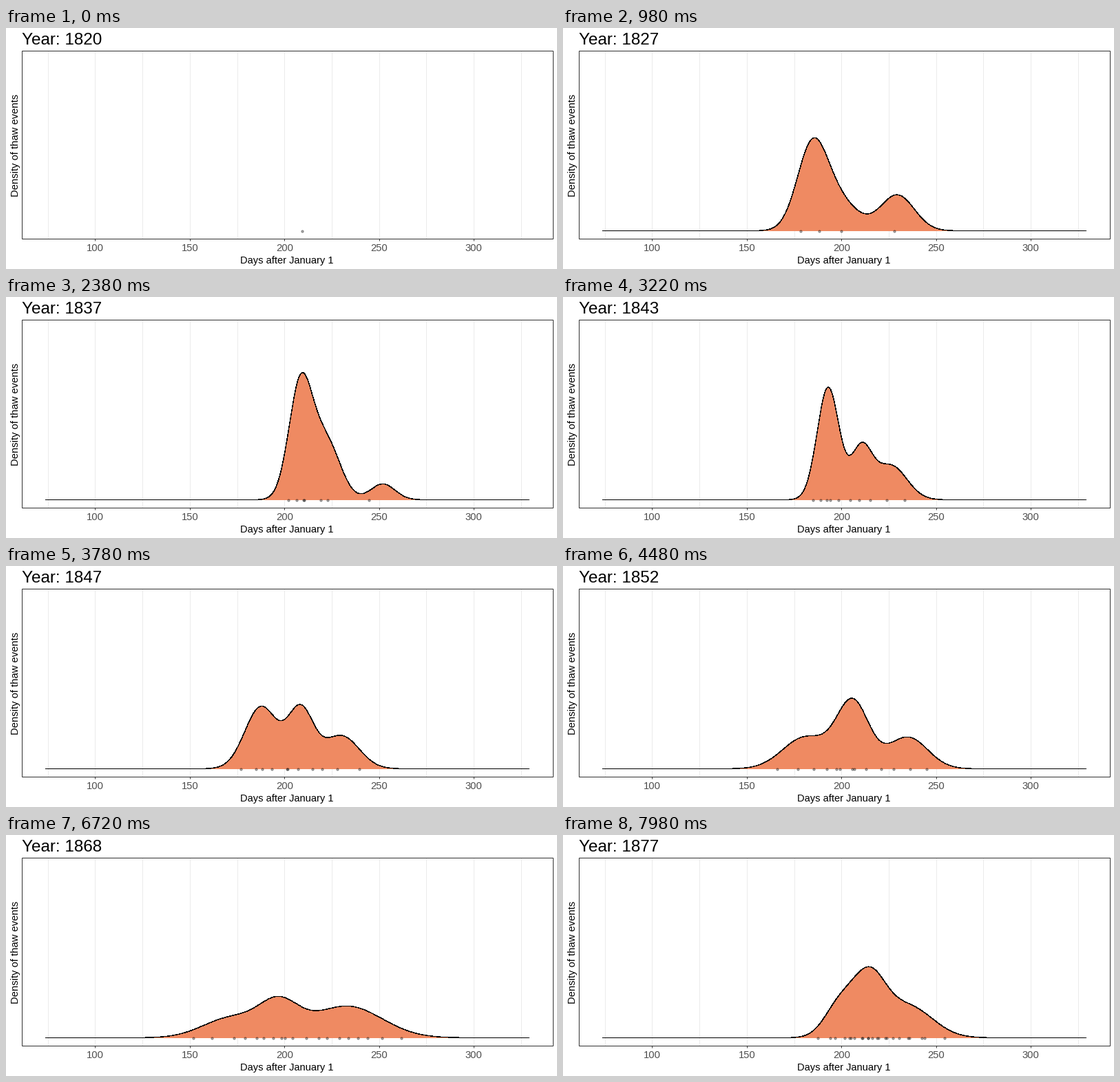
A matplotlib script that plays this animation: 800 px wide and 350 px high, repeating every 8000 ms.

```python
import numpy as np
import matplotlib.pyplot as plt
from matplotlib.animation import FuncAnimation
from matplotlib.patches import Polygon, Rectangle

W, H, DPI = 800, 350, 100
PX = 72 / DPI                 # one pixel in points
FIRST_YEAR = 1820
STEP, LOOP, TICK = 140, 8000, 20
BASE = 294.5                  # y of zero density

# Key shapes: three bumps per year as (centre day, spread, height in px)
KEYS = {
    1820: [(211, 9, 67)] * 3,
    1827: [(184.5, 8, 118), (198.5, 10, 42), (229.5, 9, 52)],
    1837: [(208.5, 6.2, 166), (222, 7.5, 84), (252, 6.5, 23)],
    1843: [(193, 5.8, 163), (210.5, 5.5, 72), (226, 8.5, 50)],
    1852: [(181, 12, 46), (206, 8.5, 96), (235, 10.5, 46)],
    1868: [(172, 15, 29), (197, 10.5, 46), (233, 18.5, 46)],
    1877: [(199, 8, 46), (214.5, 8.5, 83), (235, 13, 46)],
}
years = list(KEYS)
shapes = np.array(list(KEYS.values()), float)
shapes[..., 2] *= shapes[..., 1]      # tween areas, so the total stays even
tracks = shapes.reshape(len(years), -1).T

days = np.linspace(74, 329.3, 512)


def day_x(day):
    return 404.25 + (np.asarray(day) - 200) * 2.748


def density(year):
    pose = [np.interp(year, years, track) for track in tracks]
    centre, spread, area = np.reshape(pose, (3, 3)).T[:, :, None]
    return (area / spread * np.exp(-0.5 * ((days - centre) / spread) ** 2)).sum(0)


def events(curve, year):
    """Days spread evenly over the density, a little shaken, more each year."""
    n = round(1 + 0.38 * (year - FIRST_YEAR))
    total = np.cumsum(curve)
    even = np.interp((np.arange(n) + 0.5) / n, total / total[-1], days)
    return even + np.random.default_rng(year).normal(0, 1, n)


plt.rcParams["font.family"] = "Liberation Sans"
fig = plt.figure(figsize=(W / DPI, H / DPI), dpi=DPI, facecolor="white")
ax = fig.add_axes([0, 0, 1, 1])
ax.set(xlim=(0, W), ylim=(H, 0))
ax.axis("off")


def label(x, y, text, size, color="black", ha="center", rotation=0):
    return ax.text(x, y, text, fontsize=size * PX, color=color, ha=ha,
                   va="baseline", rotation=rotation, rotation_mode="anchor")


ax.vlines(day_x(np.arange(75, 326, 25)), 33, 306, color="#ebebeb",
          lw=PX, zorder=1)
ax.vlines(day_x(np.arange(100, 301, 50)), 306, 309, color="#333333",
          lw=PX, zorder=1)
ax.add_patch(Rectangle((23, 33), 771, 273, fill=False, ec="#333333",
                       lw=PX, zorder=5))
for d in range(100, 301, 50):
    label(day_x(d) + 0.2, 324, str(d), 14.7, "#4d4d4d")
label(408, 342, "Days after January 1", 14.6)
label(18, 170.5, "Density of thaw events", 14.7, rotation=90)
title = label(23, 24, "", 24.3, ha="left")

xs = day_x(days)
area_fill = Polygon([(0, 0)], closed=True, fc="#ef8a62", ec="none",
                    antialiased=False, zorder=2)
ax.add_patch(area_fill)
# Without antialiasing every touched pixel is inked: half a pixel draws one
outline, = ax.plot([], [], color="black", lw=0.4 * PX, antialiased=False,
                   zorder=3)
dots, = ax.plot([], [], "o", ms=3.2 * PX, mfc=(0, 0, 0, 0.28),
                mec=(0, 0, 0, 0.45), mew=0.9 * PX, ls="none", zorder=4)


def draw(i):
    year = FIRST_YEAR + i * TICK // STEP
    title.set_text(f"Year: {year}")
    curve = density(year)
    hits = events(curve, year)
    dots.set_data(day_x(hits), np.full(len(hits), BASE))

    ys = BASE - curve
    outline.set_data(xs, ys)
    area_fill.set_xy(np.column_stack([np.r_[xs, xs[-1], xs[0]],
                                      np.r_[ys, BASE, BASE]]))
    # A single event has no density
    for part in (outline, area_fill):
        part.set_visible(len(hits) > 1)
    return title, area_fill, outline, dots


anim = FuncAnimation(fig, draw, frames=LOOP // TICK, interval=TICK,
                     repeat=True, repeat_delay=0, cache_frame_data=False)
plt.show()
```
